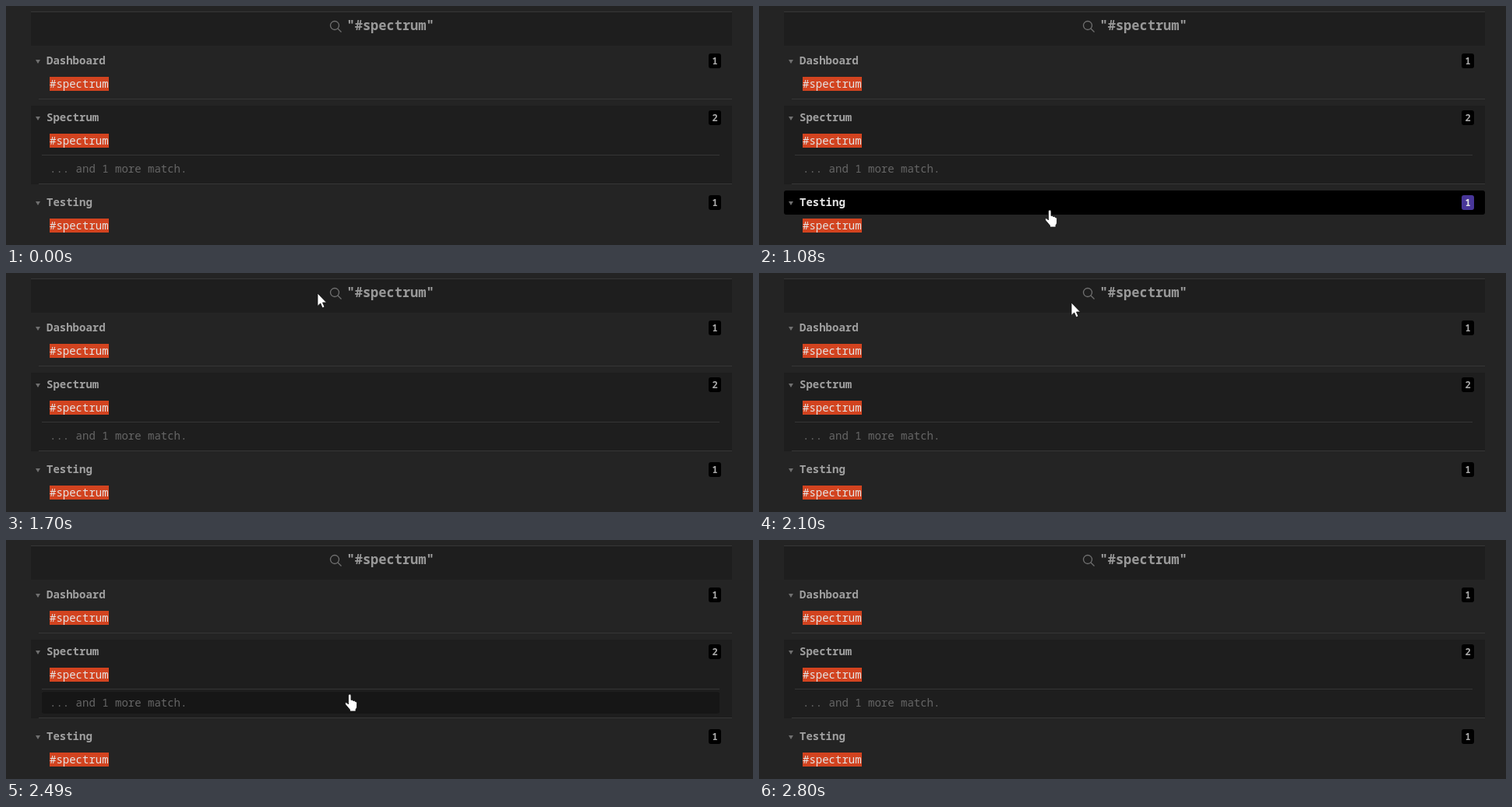
Animation, 959 px wide and 307 px high, one loop 3.66 s. Source, as an HTML page:

```html
<!DOCTYPE html>
<html lang="en">
<head>
<meta charset="utf-8">
<title>Search results</title>
<style>
  html, body { margin: 0; width: 100%; height: 100%; overflow: hidden; background: #242424; }
  svg { display: block; }
  text { font: 14px "Noto Sans Mono", "DejaVu Sans Mono", monospace; fill: #666; white-space: pre; }
  .title { font-size: 17px; font-weight: 600; fill: #999; }
  .name { font-weight: 600; fill: #a0a0a0; }
  .count { font-size: 12px; font-weight: 700; fill: #aaa; text-anchor: middle; }
  .tag { fill: #e4e4e4; }
  .panel { fill: #1e1e1e; }
  .line { fill: #363636; }
  .mark { fill: #d2431f; }
  .arrow { fill: #707070; }
  .badge { fill: #000; }
  .back { fill: none; }
  .row.hover .back { fill: #161616; }
  .header.hover .back { fill: #000; }
  .header.hover .name, .header.hover .count { fill: #e6e6e6; }
  .header.hover .badge { fill: #483699; }
  .cursor { fill: #fff; stroke: #111; stroke-width: .8; }
</style>
</head>
<body>
<svg id="stage" width="959" height="307" viewBox="0 0 959 307"></svg>
<script>
const LOOP = 3660;
const stage = document.getElementById("stage");

const rect = (cls, x, y, w, h, r = 0) =>
  `<rect class="${cls}" x="${x}" y="${y}" width="${w}" height="${h}" rx="${r}"/>`;
const text = (cls, x, y, s) => `<text class="${cls}" x="${x}" y="${y}">${s}</text>`;
const zone = (cls, y, h, body) => `<g class="${cls}" data-top="${y}" data-end="${y + h}">${body}</g>`;

const header = (y, name, count) => zone("header", y, 31,
  rect("back", 32, y, 900, 31, 3) +
  `<path class="arrow" d="M38 ${y + 14}h6l-3 5z"/>` +
  text("name", 52, y + 20, name) +
  rect("badge", 902, y + 6, 16, 19, 3) +
  text("count", 910, y + 20, count));

const row = (y, body) => zone("row", y, 28, rect("back", 46, y, 870, 28, 3) + body);

const section = (y, name, count) => header(y, name, count) +
  row(y + 31, rect("mark", 56, y + 36, 76, 18) + text("tag", 56, y + 50, "#spectrum"));

stage.innerHTML =
  rect("panel", 32, 7, 900, 44) + rect("line", 32, 7, 900, 1) +
  `<g fill="none" stroke="#707070" stroke-width="1.3"><circle cx="422" cy="25" r="5.5"/><path d="M426 29l4.5 4.5"/></g>` +
  text("title", 437.5, 31, '"#spectrum"') +
  rect("panel", 32, 128, 900, 101) +
  rect("line", 42, 119, 890, 1) + rect("line", 42, 228, 890, 1) +
  section(55, "Dashboard", 1) +
  section(128, "Spectrum", 2) +
  rect("line", 46, 191, 870, 1) +
  row(195, text("", 56, 214, "... and 1 more match.")) +
  section(237, "Testing", 1) +
  `<g class="cursor">
    <path id="pointer" d="M0 0V16.5L3.7 13L6.2 18.8L9 17.6L6.5 12H11.5Z"/>
    <path id="hand" d="M4.5 2Q4.5 0 6.2 0Q8 0 8 2V7.5Q10 6.8 10.6 8.5Q12.6 7.8 13.2 9.5Q15.5 9 15.5 11.5V16Q15.5 18 14 19.5V22H6.5V20L1 13.5Q-.3 11.5 1 10.8Q2.5 10.3 4.5 13Z"/>
  </g>`;

// Sampled mouse positions: time, left, top. The cursor is off stage at y > 306.
const path = [
  [0, 800, 400], [370, 795, 298], [450, 695, 291], [530, 580, 285], [600, 505, 282],
  [680, 456, 281], [760, 422, 281], [840, 407, 281],
  [920, 397, 277], [1000, 376, 267], [1080, 367, 262], [1160, 367, 244],
  [1240, 369, 208], [1320, 374, 158], [1390, 379, 119],
  [1480, 384, 108], [1560, 391, 88], [1640, 398, 40], [1700, 400, 26], [1780, 402, 22], [1860, 402, 20],
  [2020, 402, 24], [2100, 401, 38], [2180, 400, 70], [2260, 400, 104], [2330, 400, 122],
  [2410, 416, 154], [2490, 435, 198],
  [2570, 441, 226], [2640, 446, 256], [2720, 452, 288], [2800, 455, 400]
];
const zones = [...stage.querySelectorAll("[data-top]")];
const hand = document.getElementById("hand");
const pointer = document.getElementById("pointer");
const cursor = stage.querySelector(".cursor");

function draw(now) {
  const t = now % LOOP;
  const [, x, y] = path.findLast(p => p[0] <= t);
  let over = false;
  for (const z of zones) {
    const hit = y >= +z.dataset.top && y < +z.dataset.end;
    z.classList.toggle("hover", hit);
    over = over || hit;
  }
  cursor.setAttribute("transform", `translate(${x} ${y})`);
  hand.style.display = over ? "" : "none";
  pointer.style.display = over ? "none" : "";
  requestAnimationFrame(() => draw(performance.now()));
}
draw(performance.now());
</script>
</body>
</html>
```
